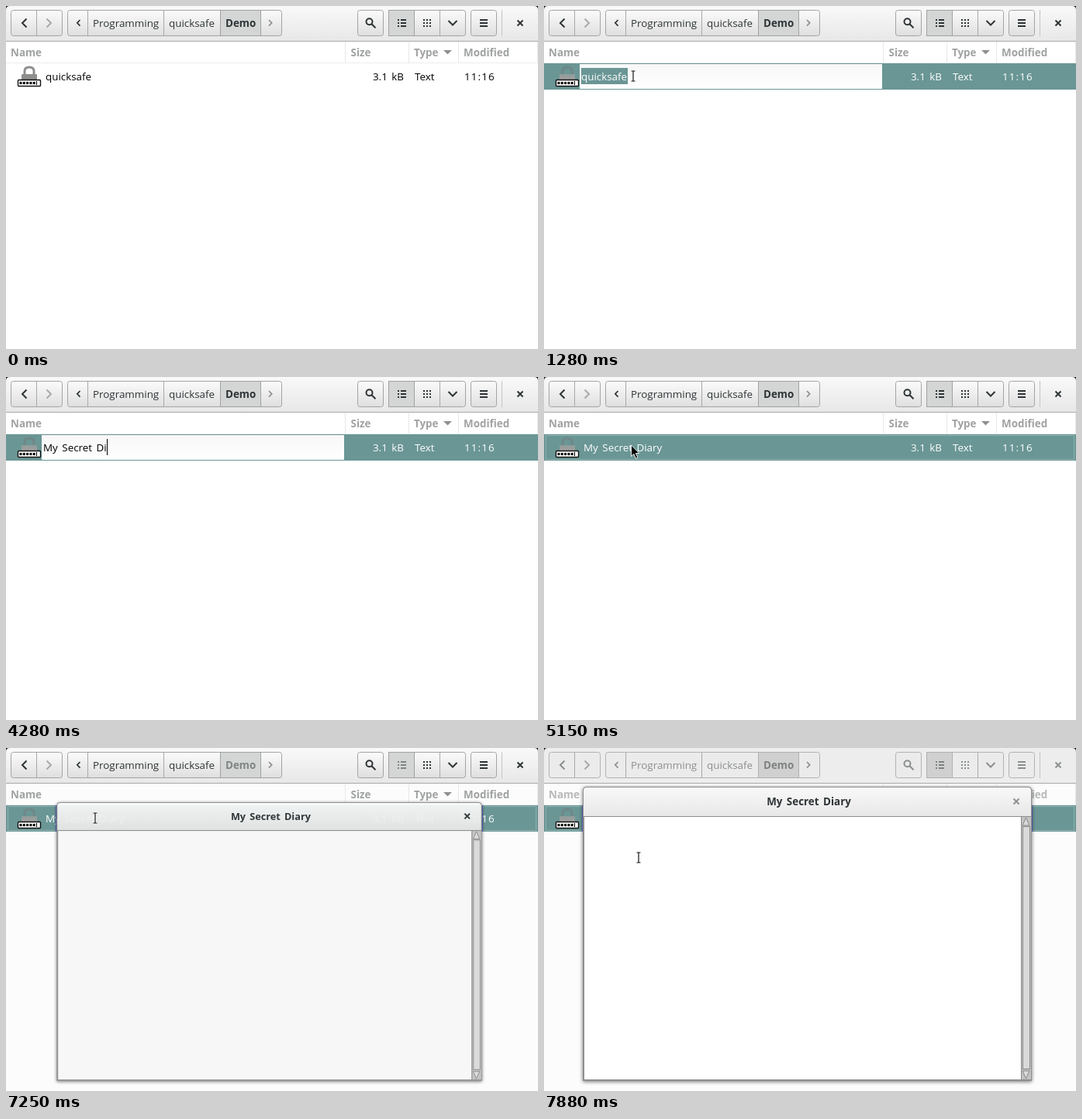
An HTML page for the animation above (8 s loop, 686x443 px).

```html
<!DOCTYPE html>
<html lang="en">
<head>
<meta charset="utf-8">
<title>Renaming a file</title>
<style>
  html, body { margin: 0; width: 100%; height: 100%; overflow: hidden; background: #fff; }
  svg { display: block; width: 686px; height: 443px; }
  text { font: 13.4px "Open Sans", "Noto Sans", sans-serif; word-spacing: 2px; white-space: pre; fill: #2e3436; }
  .bold { font-weight: 700; }
  .column { fill: #a0a2a2; }
  .spread { letter-spacing: 1.1px; }
  .end { text-anchor: end; }
  .button { fill: url(#buttonFill); stroke: #a4a4a4; }
  .rule { fill: none; stroke: #a8a8a8; }
  .on { fill: #d3d6d5; stroke: #a1a1a1; }
  .line { fill: none; stroke: #2e3436; stroke-width: 2; }
  .solid { fill: #2e3436; }
  .off { stroke: #a8aaaa; }
  #row text { fill: #000; }
  #row.selected text { fill: #fff; }
  .shackle { fill: none; stroke: #8e8f8d; stroke-width: 3; }
  .lock { fill: #8e8f8d; }
  .selected .shackle { stroke: #6f8887; }
  .selected .lock { fill: url(#lockFill); }
  #selection { fill: #6a9695; }
  .fading .active, .dim .glyph { opacity: .5; }
  .fading #paper, .dim #paper { fill: #fcfcfc; }
  .dim #bar { fill: #ededed; }
  .dim .button { fill: #ebebeb; stroke: #b2b2b2; }
  .dim .on { fill: #d0d0d0; stroke: #b0b0b0; }
  .dim .column { fill: #b8b9b9; }
  #dialog { transform-origin: 339.5px 430px; filter: drop-shadow(0 1px 2.5px rgba(0,0,0,.55)); }
</style>
</head>
<body>
<svg id="stage" viewBox="0 0 686 443"></svg>
<script>
const stage = document.getElementById('stage');

const text = (x, y, value, cls = '', id = '') =>
  `<text x="${x}" y="${y}" class="${cls}" id="${id}">${value}</text>`;
const rect = (x, y, w, h, attrs = '') =>
  `<rect x="${x}" y="${y}" width="${w}" height="${h}" ${attrs}/>`;
const path = (d, cls, attrs = '') => `<path d="${d}" class="${cls}" ${attrs}/>`;
const gradient = (id, from, to) =>
  `<linearGradient id="${id}" x2="0" y2="1"><stop stop-color="${from}"/><stop offset="1" stop-color="${to}"/></linearGradient>`;
const button = (left, right, ...dividers) =>
  rect(left + .5, 5.5, right - left - 1, 33, 'rx="3" class="button"') +
  path(dividers.map(x => `M${x + .5} 6v32`).join(''), 'rule');
const cross = (x, y) => path(`M${x - 3.5} ${y - 3.5}l7 7m0-7l-7 7`, 'line glyph');
const grid = (xs, ys, w, h) => xs.map(x => ys.map(y => rect(x, y, w, h)).join('')).join('');

const header = `
  ${rect(0, 0, 686, 20, 'fill="#222"')}
  ${path('M0 46V5Q0 0 5 0H681Q686 0 686 5V46Z', '', 'id="bar" fill="url(#barFill)"')}
  ${rect(0, 45, 686, 1, 'fill="#a9a9a9"')}
  ${button(6, 73, 39)}
  ${button(79, 356, 105, 203)}
  ${button(453, 487)}
  ${button(493, 593, 559)}
  ${button(599, 633)}
  ${rect(276.5, 5.5, 52, 33, 'class="on"')}
  ${rect(493.5, 5.5, 33, 33, 'class="on"')}
  ${rect(639, 5, 1, 34, 'fill="#c4c4c4"')}
  ${path('M26.5 16.5l-5.5 5.5 5.5 5.5', 'line glyph')}
  ${path('M52.5 16.5l5.5 5.5-5.5 5.5', 'line off')}
  ${path('M95.5 18l-3.7 3.8 3.7 3.8', 'line glyph', 'style="stroke-width:1.7"')}
  ${path('M339 18l3.7 3.8-3.7 3.8', 'line off', 'style="stroke-width:1.7;stroke:#8f9191"')}
  <g class="glyph">${text(112, 27, 'Programming')}${text(210, 27, 'quicksafe')}</g>
  <g class="glyph active">${text(283, 27, 'Demo', 'bold')}</g>
  ${path('M472.5 20.2a4 4 0 1 1-8 0a4 4 0 1 1 8 0M471.5 23.2l5 5', 'line glyph')}
  <g class="solid glyph active">${grid([505], [17, 21, 25], 2, 2)}${grid([509], [17, 21, 25], 7, 2)}</g>
  <g class="solid glyph">${grid([538, 542, 546], [17, 21, 25], 2, 2)}${grid([611], [17, 21, 25], 10, 2)}</g>
  ${path('M570.5 19l5.5 5.5 5.5-5.5', 'line glyph')}
  ${cross(663, 22)}`;

const columns = `
  ${text(6, 65, 'Name', 'bold column')}${text(444.5, 65, 'Size', 'bold column')}
  ${text(526, 65, 'Type', 'bold column')}${text(590, 65, 'Modified', 'bold column')}
  ${path('M564 57h11l-5.5 5.5z', '', 'fill="#8f9191"')}
  ${[437, 519, 583, 685].map(x => rect(x, 46, 1, 27, 'fill="#e8e8e8"')).join('')}
  ${rect(0, 73, 686, 1, 'fill="#ededed"')}`;

const icon = `
  ${path('M24 89V84Q24 79 30 79Q36 79 36 84V89', 'shackle')}
  ${rect(20, 88, 20, 8, 'rx="1" class="lock"')}
  ${rect(15.5, 95.5, 29, 8, 'rx="1" fill="#fff" stroke="#111" stroke-width="1.4"')}
  ${[19, 23.3, 27.6, 31.9, 36.2].map(x => `<circle cx="${x}" cy="99.5" r="1.7" fill="#000"/>`).join('')}
  ${rect(39, 97, 1, 5, 'fill="#000"')}`;

const row = `<g id="row">
  ${rect(0, 74, 686, 34, 'id="selection"')}
  ${rect(2.5, 75.5, 681, 31, 'id="focus" fill="none" stroke="#b4cac9" stroke-dasharray="1 1"')}
  ${icon}
  ${text(51, 96, '', '', 'name')}
  ${text(513, 96, '3.1 kB', 'end')}${text(527, 96, 'Text')}${text(591, 96, '11:16', 'spread')}
</g>`;

const entry = `<g id="entry">
  ${rect(46, 75, 390, 32, 'fill="url(#entryFill)"')}
  ${rect(48, 80, 60, 21, 'id="marked" fill="#6a9695"')}
  ${text(48, 96, '', '', 'typed')}
  ${rect(0, 80, 1, 21, 'id="caret"')}
</g>`;

const dialog = `<g id="dialog">
  ${path('M50 430V55Q50 50 55 50H624Q629 50 629 55V430Z', '', 'fill="#8c8f8e"')}
  ${path('M51 88V55Q51 51 55 51H624Q628 51 628 55V88Z', '', 'fill="url(#barFill)"')}
  ${text(339.5 + 2, 74, 'My Secret Diary', 'bold', 'title')}
  ${cross(609, 69)}
  ${rect(52, 89, 563, 339, 'id="page"')}
  ${rect(615, 89, 13, 339, 'fill="#c3c3c3"')}
  ${rect(615, 89, 1, 339, 'fill="#888"')}
  ${rect(617.5, 101.5, 9, 313, 'fill="#d9d9d9" stroke="#8a8a8a"')}
  ${path('M617 100l4.5-10 4.5 10zM617 417h9l-4.5 10z', '', 'fill="#d9d9d9" stroke="#888"')}
</g>`;

stage.innerHTML = `
  <defs>
    ${gradient('barFill', '#f9f9f9', '#e7e7e7')}
    ${gradient('buttonFill', '#fbfbfb', '#dfdfdf')}
    ${gradient('entryFill', '#f7f7f7', '#ffffff')}
    ${gradient('lockFill', '#8f9c9b', '#a3a19f')}
  </defs>
  ${rect(0, 0, 686, 443, 'id="paper" fill="#fff"')}
  ${header}${columns}${row}${entry}${dialog}
  ${path('', '', 'id="edges" stroke="#5450a4" fill="none"')}
  ${path('M0 0V14.5L3.4 11.4 6 17.3 8.4 16.2 5.8 10.5H10.3Z', '', 'id="arrow" transform="translate(112.5 88)" stroke="#fff" stroke-width=".9"')}
  <g id="beam" fill="none">
    ${['#fff" stroke-width="3', '#111" stroke-width="1.2'].map(stroke =>
      `<path d="M-2.5-6.5H2.5M0-6.5V6.5M-2.5 6.5H2.5" stroke="${stroke}"/>`).join('')}
  </g>`;

const el = id => document.getElementById(id);
const show = (id, visible) => { el(id).style.display = visible ? '' : 'none'; };
el('title').style.textAnchor = 'middle';
el('title').setAttribute('x', 341.5);

const LOOP = 8000;
const SELECT = 500, EDIT = 1240, TYPE = 1770, COMMIT = 5080, FOCUS = 5150;
const LAUNCH = 7150, OPEN = 7200, SETTLED = 7300, MOVE = 7760;
const fullName = 'My Secret Diary';
// Time and number of typed characters
const keys = [[1770, 1], [2160, 2], [2510, 4], [2970, 6], [3250, 7], [3680, 9],
              [4020, 10], [4280, 12], [4680, 14], [5010, 15]];

function drawEntry(t) {
  const editing = t >= EDIT && t < COMMIT;
  show('entry', editing);
  if (!editing) return;
  const typing = t >= TYPE;
  const count = keys.reduce((n, [time, length]) => t >= time ? length : n, 0);
  const typed = el('typed');
  typed.textContent = typing ? fullName.slice(0, count) : 'quicksafe';
  typed.style.fill = typing ? '#000' : '#fff';
  show('marked', !typing);
  show('caret', typing);
  el('caret').setAttribute('x', Math.round(48 + typed.getComputedTextLength()));
}

function drawDialog(t) {
  const open = t >= OPEN;
  show('dialog', open);
  show('edges', open);
  stage.classList.toggle('fading', open);
  stage.classList.toggle('dim', t >= SETTLED);
  if (!open) return;
  // Exponential ease-out from the bottom edge, sampled every 50 ms
  const progress = (Math.floor((t - LAUNCH) / 50) * 50 + 6) / 250;
  const scale = progress >= .8 ? 1 : 1 - 2 ** (-10 * progress);
  el('dialog').style.transform = `scale(${scale})`;
  el('dialog').style.opacity = scale;
  el('page').setAttribute('fill', t >= SETTLED ? '#fff' : '#f7f7f7');
  el('edges').setAttribute('d', [-1, 1].map(side =>
    `M${Math.round(339.5 + side * 290) === 0 ? 0 : Math.floor(339.5 + side * 290 * scale) + .5} 74v34`).join(''));
}

function drawPointer(t) {
  const beam = t >= EDIT && t < TYPE || t >= LAUNCH;
  show('beam', beam);
  show('arrow', t >= SELECT && t < EDIT || t >= FOCUS && t < LAUNCH);
  const step = t < MOVE ? 0 : Math.min(4, Math.floor((t - MOVE) / 40) + 1) / 4;
  el('beam').setAttribute('transform', `translate(${115 + 7 * step} ${90.5 + 51 * step})`);
}

function draw(t) {
  const selected = t >= SELECT;
  el('row').classList.toggle('selected', selected);
  show('selection', selected);
  show('focus', t >= FOCUS);
  el('name').textContent = t < COMMIT ? 'quicksafe' : fullName;
  drawEntry(t);
  drawDialog(t);
  drawPointer(t);
}

const start = performance.now();
function tick() {
  draw((performance.now() - start) % LOOP);
  requestAnimationFrame(tick);
}
tick();
</script>
</body>
</html>
```
